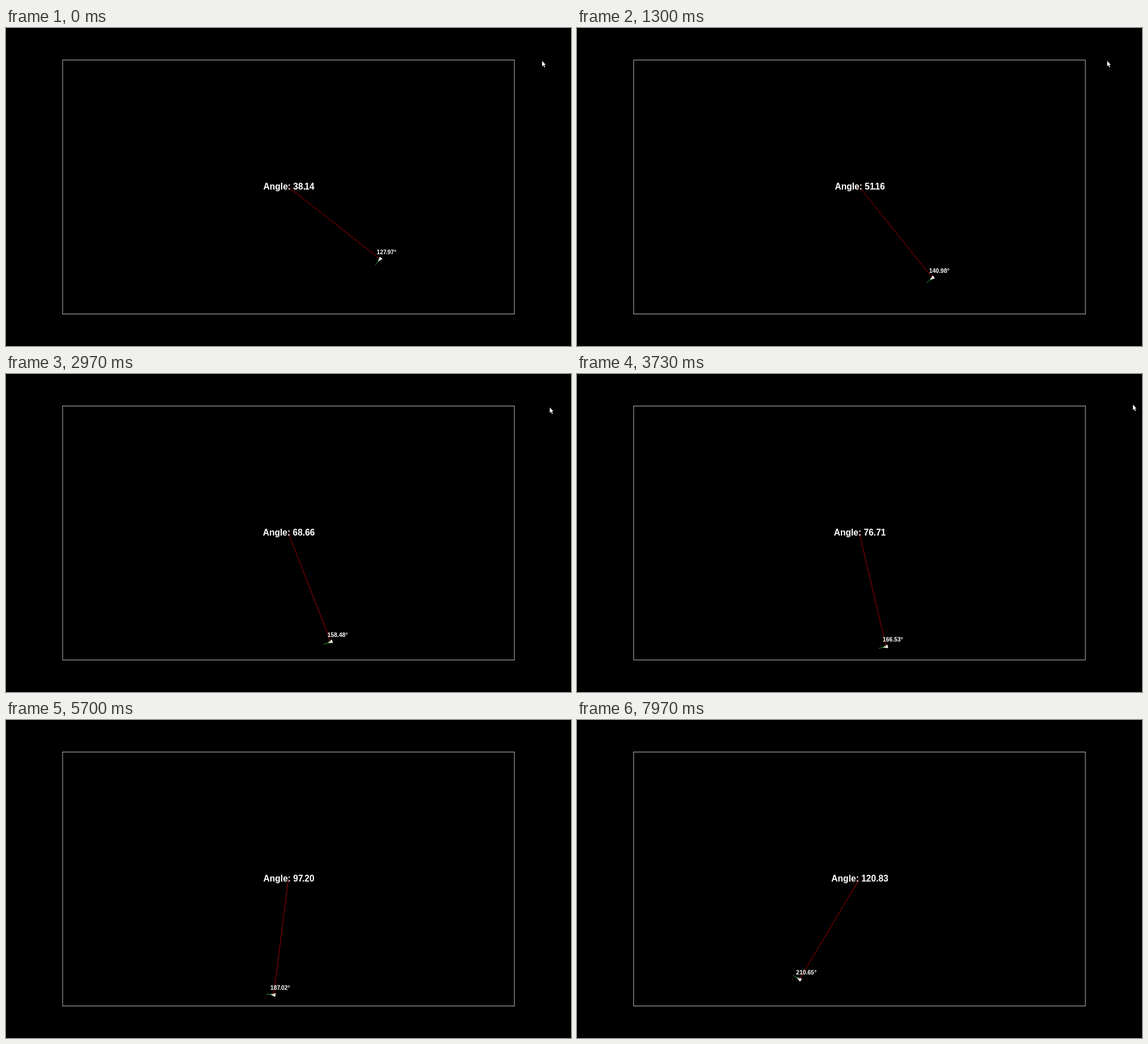
Animation of 998 by 561 pixels, one loop 8000 ms. Source, as an HTML page with a canvas:

```html
<!DOCTYPE html>
<html lang="en">
<head>
<meta charset="utf-8">
<title>Orbit angle</title>
<style>
  html, body { margin: 0; width: 100%; height: 100%; overflow: hidden; background: #000; }
  canvas { display: block; }
</style>
</head>
<body>
<canvas id="stage" width="998" height="561"></canvas>
<script>
const ctx = document.getElementById('stage').getContext('2d');
const LOOP = 8000, STEP = 100 / 3, LAST_STEP = 239;
const CENTER = { x: 498.7, y: 280.5 }, RADIUS = 206;
const ARROW = new Path2D('M0 0V9.5L2.2 7.6 3.8 11.4 5.2 10.8 3.6 7.1 6.3 6.9Z');
const TIGHT_PAIR = /\.1|[17]\.|1[17]/;

const progress = (step, from, to) => Math.min(1, Math.max(0, (step - from) / (to - from)));
const easeOut = (step, from, to) => 1 - (1 - progress(step, from, to)) ** 2;

// Steady turn that lags a little in two stretches
function angleAt(step) {
  return 38.1445 + 0.35 * step - 0.637 * progress(step, 0, 39) - 0.3245 * progress(step, 134, 208);
}

// Drifts left, swings right, rises, then leaves the stage
function pointerAt(step) {
  const exit = progress(step, 150, 162);
  return [
    947 - 14 * easeOut(step, 26, 52) + 50.5 * easeOut(step, 74, 120) + 16 * exit,
    58 + easeOut(step, 74, 89) - 8 * progress(step, 99, 120) - 6 * exit
  ];
}

function line(x1, y1, x2, y2, color) {
  ctx.strokeStyle = color;
  ctx.lineWidth = 0.75;
  ctx.beginPath();
  ctx.moveTo(x1, y1);
  ctx.lineTo(x2, y2);
  ctx.stroke();
}

function text(str, x, y, size, centered) {
  ctx.font = `bold ${size}px "Liberation Sans", Arial, sans-serif`;
  let width = 0;
  const offsets = [...str].map((ch, i) => {
    if (i && TIGHT_PAIR.test(str[i - 1] + ch)) width -= 0.11 * size;
    const offset = width;
    width += ctx.measureText(ch).width;
    return offset;
  });
  const left = centered ? x - width / 2 : x;
  offsets.forEach((offset, i) => ctx.fillText(str[i], left + offset, y));
}

function drawShip(x, y, heading) {
  ctx.save();
  ctx.translate(x, y);
  ctx.rotate(heading * Math.PI / 180);
  ctx.beginPath();
  ctx.moveTo(6.5, 0);
  ctx.lineTo(-3, 3.2);
  ctx.lineTo(-3, -3.2);
  ctx.fill();
  line(0, 0, 13.5, 0, '#30c030');
  ctx.restore();
}

function draw(step) {
  const angle = angleAt(step), heading = angle + 89.8215;
  const rad = angle * Math.PI / 180;
  const x = CENTER.x + RADIUS * Math.cos(rad), y = CENTER.y + RADIUS * Math.sin(rad);

  ctx.fillStyle = '#000';
  ctx.fillRect(0, 0, 998, 561);
  ctx.strokeStyle = '#c0c0c0';
  ctx.lineWidth = 1;
  ctx.strokeRect(100, 56.5, 798, 448);

  ctx.fillStyle = '#fff';
  drawShip(x, y, heading);
  line(CENTER.x, CENTER.y, x, y, '#e00000');
  text(`${heading.toFixed(2)}°`, x - 6, y - 8.8, 10.4, false);
  text(`Angle: ${angle.toFixed(2)}`, 499.6, 285, 15.6, true);

  ctx.save();
  ctx.translate(...pointerAt(step));
  ctx.fill(ARROW);
  ctx.restore();
}

function tick() {
  const time = performance.now() % LOOP;
  draw(Math.min(LAST_STEP, Math.floor((time + 7) / STEP)));
  requestAnimationFrame(tick);
}
tick();
</script>
</body>
</html>
```
